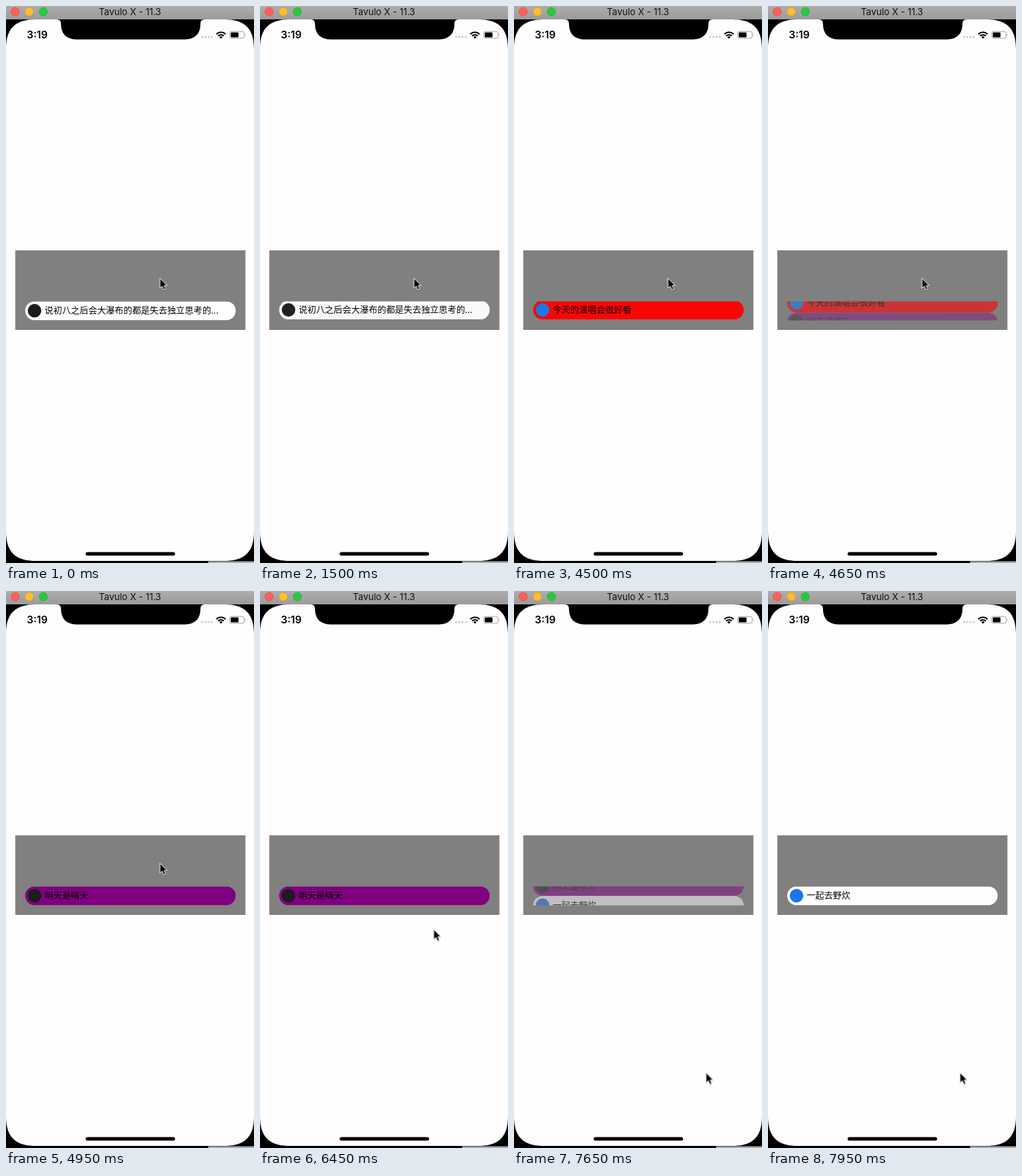
These frames come from a looping animation (352 by 791 pixels, 8 s). An HTML page:

```html
<!DOCTYPE html>
<html lang="zh-CN">
<head>
<meta charset="utf-8">
<title>Vertical notice ticker</title>
<style>
  @property --step { syntax: "<number>"; inherits: true; initial-value: 0; }

  html, body { margin: 0; width: 100%; height: 100%; overflow: hidden; background: #000; }
  svg { display: block; width: 100vw; height: 100vh; }
  text { font-family: Inter, "Noto Sans", sans-serif; }

  /* Each notice pushes the previous one up while both cross-fade. */
  .ticker { animation: push 8s step-end infinite; }
  .notice {
    --offset: calc(var(--index) - var(--step));
    transform: translateY(calc(var(--offset) * 27px));
    opacity: calc(1 - max(var(--offset), -1 * var(--offset)));
  }
  .notice text { font: 12.45px "Noto Sans CJK SC", "Noto Sans CJK", sans-serif; fill: #000; }

  @keyframes push {
    0% { --step: 0; }
    18.75% { --step: .042; }
    20.625% { --step: .407; }
    22.5% { --step: .86; }
    24.375% { --step: 1; }
    56.25% { --step: 1.042; }
    58.125% { --step: 1.407; }
    60% { --step: 1.86; }
    61.875% { --step: 2; }
    93.75% { --step: 2.084; }
    95.625% { --step: 2.5; }
    97.5% { --step: 2.917; }
    99.375%, 100% { --step: 3; }
  }

  .pointer { animation: point 8s step-end infinite; }
  @keyframes point {
    0% { transform: translate(218.5px, 386px); }
    78.75% { transform: translate(218.5px, 391px); }
    80.625% { transform: translate(246.5px, 480px); }
    82.5% { transform: translate(259.5px, 580px); }
    84.375% { transform: translate(259.5px, 648px); }
    90% { transform: translate(265.5px, 673px); }
    91.875% { transform: translate(269.5px, 681px); }
    93.75% { transform: translate(271.5px, 683.5px); }
    95.625%, 100% { transform: translate(272.5px, 683.5px); }
  }
</style>
</head>
<body>
<svg viewBox="0 0 352 791" preserveAspectRatio="none">
  <defs>
    <linearGradient id="chrome" x2="0" y2="1">
      <stop stop-color="#adadad"/>
      <stop offset="1" stop-color="#9b9b9b"/>
    </linearGradient>
    <clipPath id="window"><rect x="27" y="419.4" width="299.2" height="27"/></clipPath>
  </defs>

  <rect width="352" height="791"/>
  <rect x="287" y="788.5" width="65" height="3" fill="#a8a8a8"/>

  <!-- title bar -->
  <rect width="352" height="19" fill="url(#chrome)"/>
  <g stroke-width=".6">
    <circle cx="13" cy="8" r="6" fill="#ff5f57" stroke="#e0443e"/>
    <circle cx="33" cy="8" r="6" fill="#ffbd2e" stroke="#dea123"/>
    <circle cx="53" cy="8" r="6" fill="#28c940" stroke="#1aab29"/>
  </g>
  <text x="176" y="13" font-size="13" text-anchor="middle" fill="#111">Tavulo X - 11.3</text>

  <!-- screen -->
  <path fill="#fefefe" d="M0 61C0 32 13 19 42 19H72Q78 19 78 25C78 40 86 47.5 101 47.5H253C268 47.5 276 40 276 25Q276 19 282 19H310C339 19 352 32 352 61V746C352 775 339 788 310 788H42C13 788 0 775 0 746Z"/>
  <rect x="113" y="775.5" width="127" height="5" rx="2.5"/>

  <!-- status bar -->
  <text x="29.6" y="46" font-size="14.6" font-weight="600">3:19</text>
  <path d="M278.5 44H294" stroke="#cbcbcb" stroke-width="3" stroke-dasharray="0 4.5" stroke-linecap="round"/>
  <g fill="none" stroke="#000" stroke-width="2.1">
    <path d="M298.6 40A9.2 9.2 0 0 1 311.6 40"/>
    <path d="M301 42.6A5.9 5.9 0 0 1 309.2 42.6"/>
  </g>
  <path d="M305.1 46.6L302.8 44.2A3.3 3.3 0 0 1 307.4 44.2Z"/>
  <rect x="317.5" y="36.2" width="20.6" height="9.6" rx="2.4" fill="none" stroke="#a2a2a2"/>
  <rect x="319" y="37.6" width="11" height="6.8" rx="1"/>
  <path d="M339.1 39.2Q340.6 41 339.1 42.8Z" fill="#a2a2a2"/>

  <!-- notices -->
  <rect x="13.2" y="347" width="326.6" height="113" fill="#808080"/>
  <g class="ticker" clip-path="url(#window)">
    <g class="notice" style="--index: 0">
      <rect x="27.2" y="419.4" width="298.8" height="26.8" rx="13.4" fill="#fefefe"/>
      <circle cx="40.5" cy="432.7" r="9.6" fill="#1c1c1c"/>
      <text x="54.8" y="437.4">说初八之后会大瀑布的都是失去独立思考的...</text>
    </g>
    <g class="notice" style="--index: 1">
      <rect x="27.2" y="419.4" width="298.8" height="26.8" rx="13.4" fill="#f00"/>
      <circle cx="40.5" cy="432.7" r="9.6" fill="#1877ee"/>
      <text x="54.8" y="437.4">今天的演唱会很好看</text>
    </g>
    <g class="notice" style="--index: 2">
      <rect x="27.2" y="419.4" width="298.8" height="26.8" rx="13.4" fill="#800080"/>
      <circle cx="40.5" cy="432.7" r="9.6" fill="#1c1c1c"/>
      <text x="54.8" y="437.4">明天是晴天</text>
    </g>
    <g class="notice" style="--index: 3">
      <rect x="27.2" y="419.4" width="298.8" height="26.8" rx="13.4" fill="#fefefe"/>
      <circle cx="40.5" cy="432.7" r="9.6" fill="#1877ee"/>
      <text x="54.8" y="437.4">一起去野炊</text>
    </g>
  </g>

  <g class="pointer">
    <path d="M0 1V15.6L3.4 12.6L5.7 17.8L8.6 16.5L6.4 11.5H10.6Z" fill="#000" opacity=".25" transform="translate(0 1)"/>
    <path d="M0 .6V14.9L3.3 11.9L5.5 17L8.2 15.8L6 10.9H10.3Z" stroke="#fff" stroke-width="1"/>
  </g>
</svg>
</body>
</html>
```
